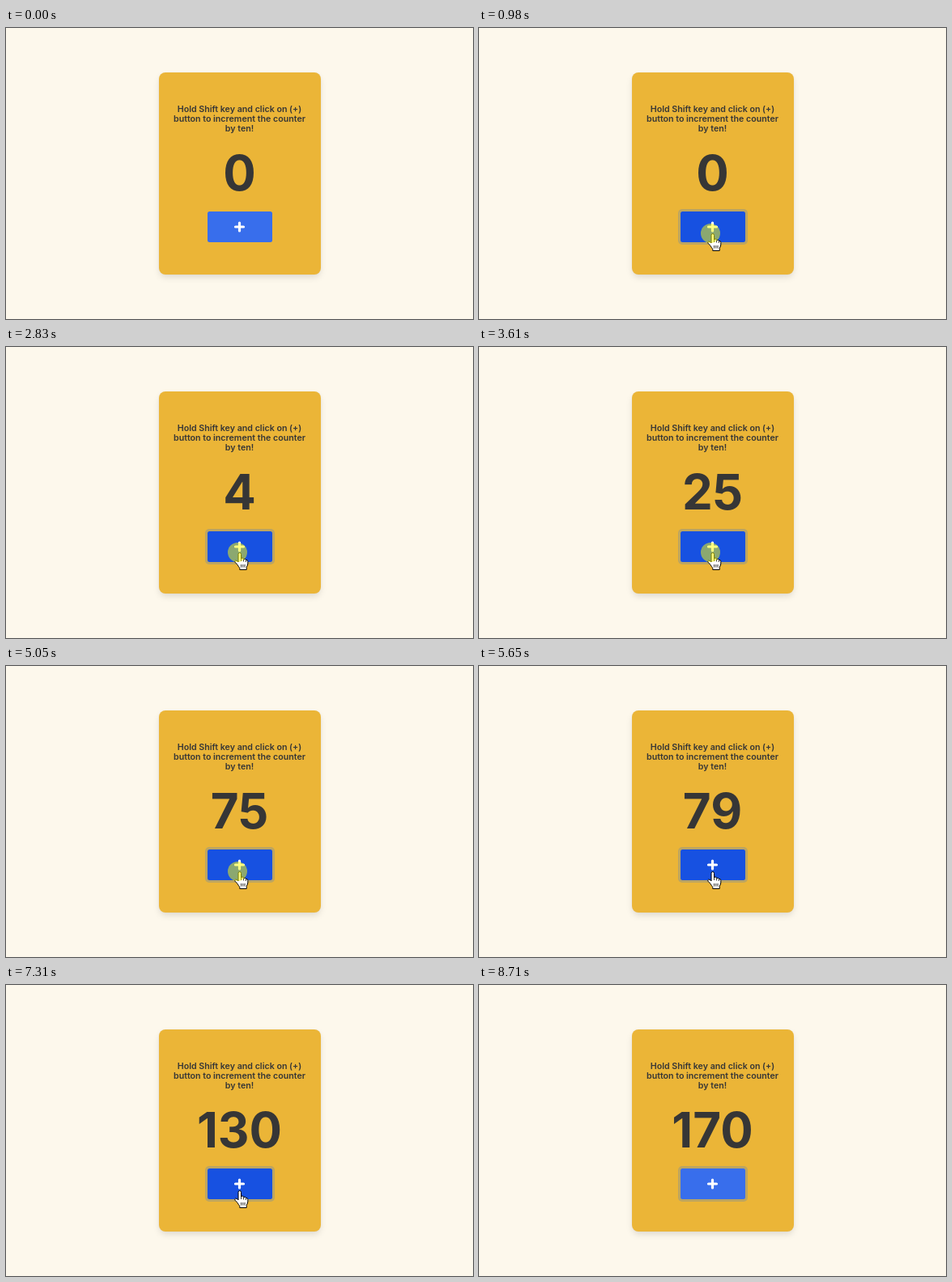
These frames come from a looping animation (577x360 px, 8740 ms). An HTML page:

```html
<!DOCTYPE html>
<html lang="en">
<head>
<meta charset="utf-8">
<title>Counter</title>
<style>
  html, body { margin: 0; width: 100%; height: 100%; overflow: hidden; background: #fdf8ec; }
  svg { position: absolute; left: 0; top: 0; }
  text { font-family: Inter, sans-serif; fill: #363636; text-anchor: middle; }
  .card {
    position: absolute; left: 189px; top: 55px; width: 200px; height: 250px;
    border-radius: 8px; background: #ebb537;
    box-shadow: 0 4px 8px -1px rgba(10, 10, 10, .13), 0 0 0 1px rgba(10, 10, 10, .015);
  }
  .hint { font-size: 10.67px; font-weight: 600; }
  #count { font-size: 60px; font-weight: 700; }
</style>
</head>
<body>
<div class="card"></div>
<svg width="577" height="360" viewBox="0 0 577 360">
  <g class="hint">
    <text x="288.5" y="104">Hold Shift key and click on (+)</text>
    <text x="288.5" y="116">button to increment the counter</text>
    <text x="288.5" y="128">by ten!</text>
  </g>
  <text id="count" x="288.5" y="201">0</text>
  <g id="button">
    <rect id="ring" x="246" y="224" width="86" height="44" rx="5" fill="#bda560"/>
    <rect id="face" x="249" y="227" width="80" height="38" rx="2.5"/>
    <path d="M283.5 246h10M288.5 241v10" stroke="#fff" stroke-width="3.2" stroke-linecap="round"/>
  </g>
  <g id="cursor" stroke-linejoin="round">
    <path id="arrow" d="M0 0V15.2L3.4 12L5.6 17.2L8.2 16.1L6 11.1H10.8Z" fill="#000" stroke="#fff"/>
    <g id="hand" transform="translate(-4 0)">
      <path d="M5 2.5Q5 .5 6.7 .5Q8.5 .5 8.5 2.5V8Q8.8 6.8 10.2 7Q11.6 7.2 11.7 8.5Q13.8 7.5 14.4 9.3Q16.8 9 16.8 11.5V14Q16.8 16 15.2 18.3V21.5H6.8V19.5Q5.5 17.8 4 15.5Q2.8 14 1 12.2Q.2 10.6 1.6 10.1Q3.2 9.8 5 12Z" fill="#fff" stroke="#000"/>
      <path d="M8.5 8v3M11.6 8.5v3M14.4 9.5v2.5M8.6 15v3.5M10.8 15v3.5M13 15v3.5" stroke="#000" stroke-width=".8"/>
    </g>
    <circle id="glow" r="12" fill="#ff0" opacity=".5"/>
  </g>
</svg>
<script>
  const LOOP = 8740;
  const REST = [286, 254];
  const $ = id => document.getElementById(id);
  const [count, button, ring, face, cursor, arrow, hand, glow] =
    ['count', 'button', 'ring', 'face', 'cursor', 'arrow', 'hand', 'glow'].map($);

  // Evenly spaced clicks: first press, spacing, hold time, number of clicks, increment.
  const burst = (start, gap, hold, n, step) =>
    Array.from({ length: n }, (_, i) => ({ down: start + i * gap, up: start + i * gap + hold, step }));

  const clicks = [
    ...burst(980, 285, 100, 3, 1),
    ...burst(1980, 0, 190, 1, 1),
    ...burst(2740, 0, 120, 1, 1),
    ...burst(3300, 145, 95, 3, 10),
    ...burst(3900, 170, 100, 4, 10),
    ...burst(5050, 167, 99, 4, 1),
    ...burst(6010, 0, 130, 1, 1),
    ...burst(6570, 160, 100, 5, 10),
    ...burst(7410, 163, 80, 4, 10)
  ];

  const mix = (a, b, p) => a.map((v, i) => v + (b[i] - v) * p);
  const show = (el, on) => el.setAttribute('visibility', on ? 'visible' : 'hidden');

  function cursorAt(t) {
    if (t < 680) {
      const p = Math.max(0, (t - 200) / 480);
      return mix([393, 362], REST, 1 - (1 - p) ** 2);
    }
    if (t < 8010) return REST;
    const p = Math.min(1, (t - 8010) / 200);
    return mix(REST, [492, 366], p ** 1.5);
  }

  function draw(t) {
    const [x, y] = cursorAt(t);
    const hover = x > 249 && x < 329 && y > 227 && y < 265;
    const pressed = clicks.some(c => t >= c.down + 20 && t < c.up);

    count.textContent = clicks.reduce((sum, c) => sum + (t >= c.up ? c.step : 0), 0);
    button.setAttribute('transform', `translate(0 ${pressed ? 1 : 0})`);
    face.setAttribute('fill', hover ? '#1751e1' : '#386eec');
    show(ring, t >= 980);
    cursor.setAttribute('transform', `translate(${Math.round(x)} ${Math.round(y)})`);
    show(cursor, t >= 200 && t < 8210);
    const visible = t >= 200 && t < 8210;
    show(hand, visible && hover);
    show(arrow, visible && !hover);
    show(glow, clicks.some(c => t >= c.down && t < c.up - 20));
  }

  function tick() {
    draw(performance.now() % LOOP);
    requestAnimationFrame(tick);
  }
  tick();
</script>
</body>
</html>
```
